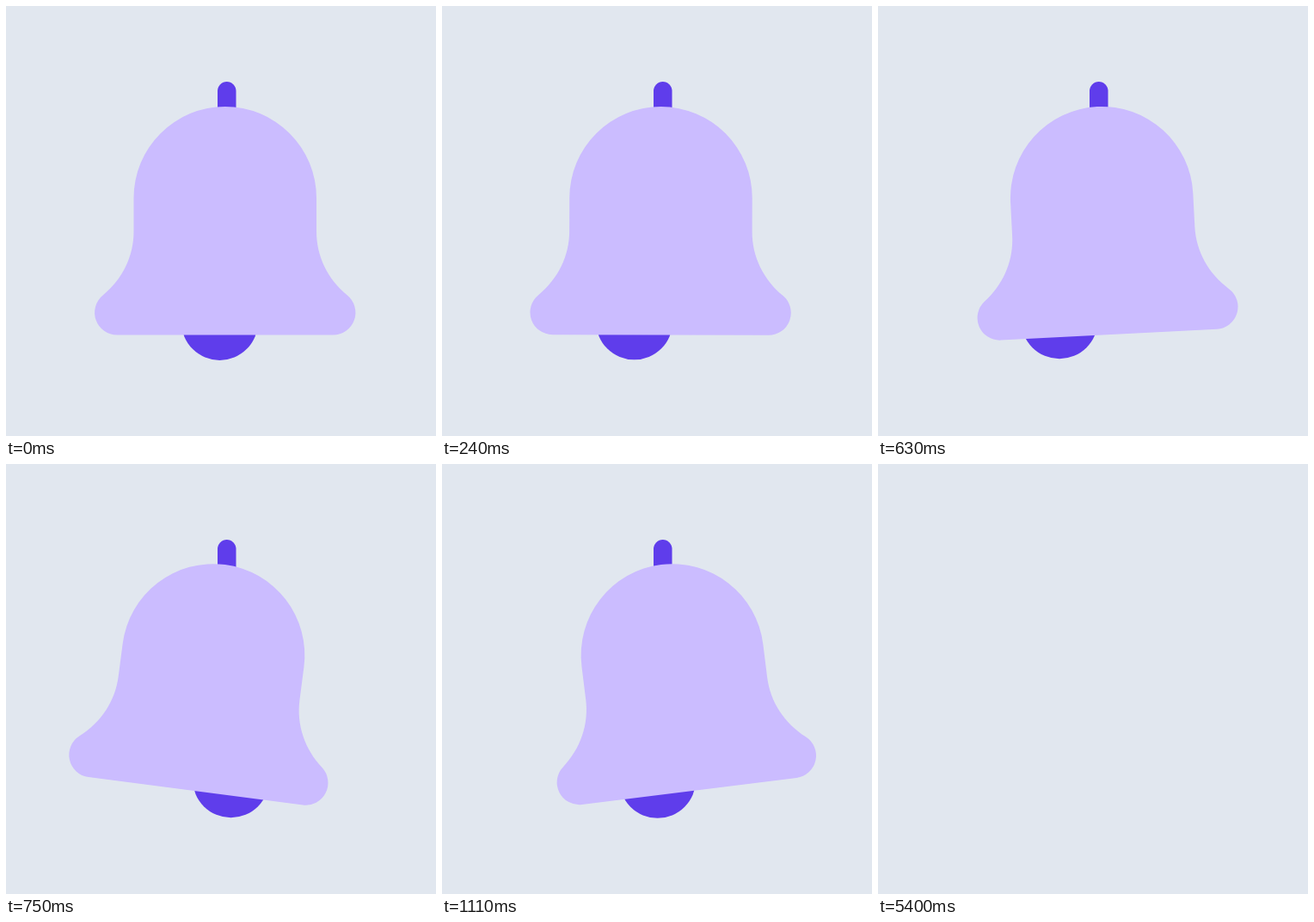
Animation of 500x500 px, one loop 5.43 s. Source, as an HTML page:

```html
<!DOCTYPE html>
<html lang="en">
<head>
<meta charset="utf-8">
<title>Ringing bell</title>
<style>
  html, body { margin: 0; width: 100%; height: 100%; overflow: hidden; background: #e1e7ef; }
  svg { display: block; width: 100%; height: 100%; }
</style>
</head>
<body>
<svg viewBox="0 0 500 500">
  <g id="scene">
    <rect x="246" y="88" width="21.5" height="50" rx="10.75" fill="#5f3deb"/>
    <circle id="clapper" r="44.5" fill="#5f3deb"/>
    <path id="bell" fill="#cbbcff" d="M148.5 223.25A106.25 106.25 0 0 1 361 223.25V262
      C361 291 374 317.5 397 336.5A26 26 0 0 1 380.5 382.5H129A26 26 0 0 1 112.5 336.5
      C135.5 317.5 148.5 291 148.5 262Z"/>
  </g>
</svg>
<script>
const LOOP = 5.43, HIDE_AT = 5.4, RING_END = 1.344; // seconds
const PIVOT_Y = 117, CLAPPER_ARM = 250.5;
const [scene, clapper, bell] = ['scene', 'clapper', 'bell'].map(id => document.getElementById(id));

// Six half swings that slow down; the first and last join the rest position
function bellAngle(t) {
  const swing = Math.sqrt(23.4 + 70 * t) - 4.84;
  const wave = Math.cos(Math.PI * swing);
  return swing < 1 || swing > 5 ? 4 * (wave - 1) : 8 * wave;
}

// The clapper speeds up while it swings
function clapperShift(t) {
  return 31 * Math.cos(Math.PI * (1.71 * t * t + 4.25 * t - 0.43));
}

function draw(t) {
  scene.setAttribute('visibility', t < HIDE_AT ? 'visible' : 'hidden');
  const ring = Math.min(t, RING_END);
  bell.setAttribute('transform', `rotate(${bellAngle(ring)} 254.75 ${PIVOT_Y})`);
  const shift = clapperShift(ring);
  clapper.setAttribute('cx', 241.3 + shift);
  clapper.setAttribute('cy', PIVOT_Y + Math.sqrt(CLAPPER_ARM ** 2 - shift ** 2));
}

const start = performance.now();
function tick() {
  draw((performance.now() - start) / 1000 % LOOP);
  requestAnimationFrame(tick);
}
tick();
</script>
</body>
</html>
```
